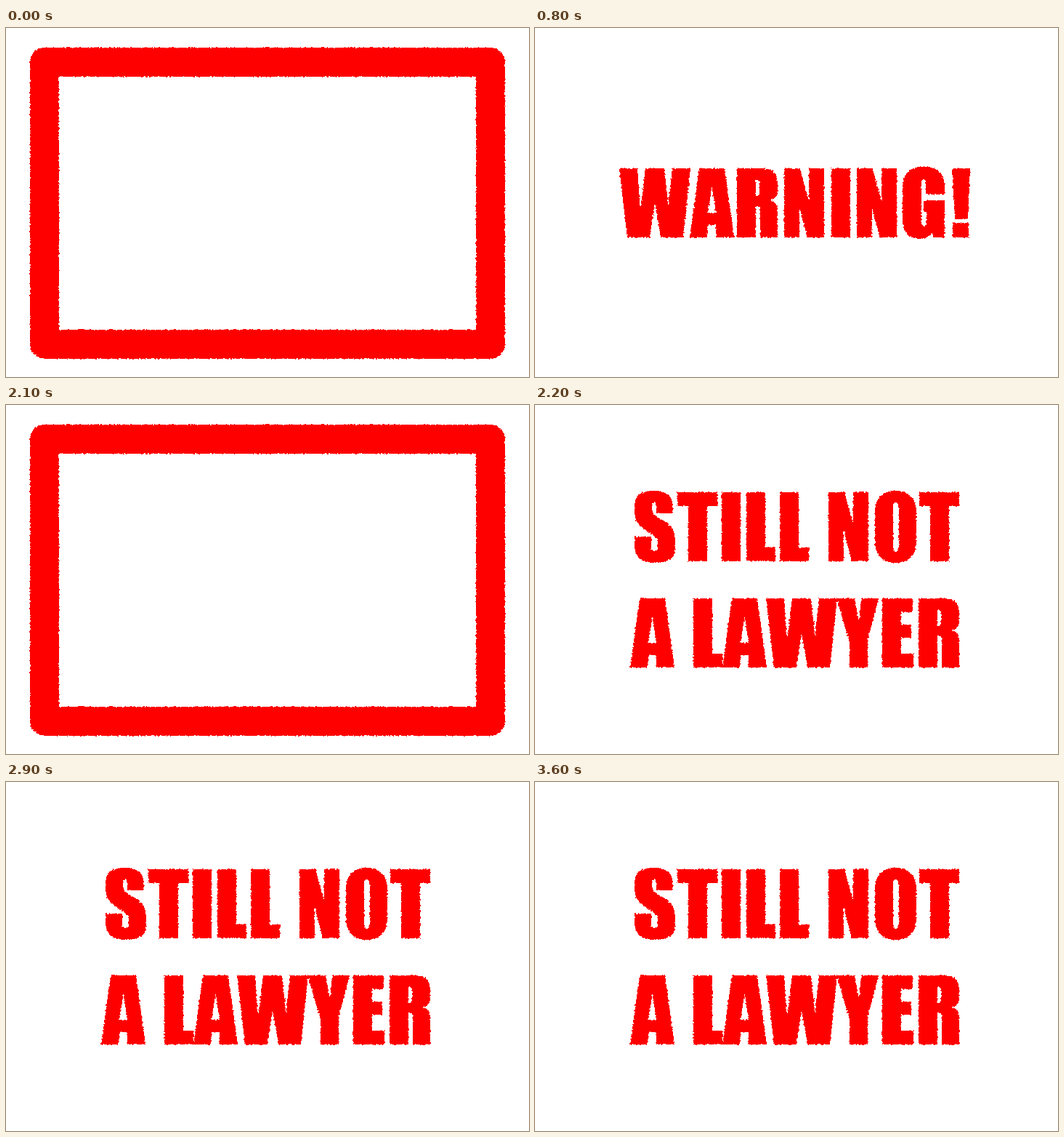
Write an HTML page that moves like this. It is 720 by 480 pixels and loops after 4200 ms.

```html
<!DOCTYPE html>
<html lang="en">
<head>
<meta charset="utf-8">
<title>Warning! Still not a lawyer</title>
<style>
  html, body { margin: 0; width: 100%; height: 100%; overflow: hidden; background: #fff; }
  svg { display: block; width: 720px; height: 480px; }
  g { fill: #f00; fill-rule: evenodd; shape-rendering: crispEdges; }
</style>
</head>
<body>
<svg viewBox="0 0 720 480" role="img">
  <title>WARNING! STILL NOT A LAWYER</title>
  <filter id="rough" filterUnits="userSpaceOnUse" x="0" y="0" width="720" height="480" color-interpolation-filters="sRGB">
    <feTurbulence type="fractalNoise" baseFrequency="0.43" numOctaves="1" seed="7" result="noise"/>
    <feDisplacementMap in="SourceGraphic" in2="noise" scale="4" xChannelSelector="R" yChannelSelector="G"/>
  </filter>
  <g id="border" filter="url(#rough)">
    <rect x="53" y="47" width="614" height="388" fill="none" stroke="#f00" stroke-width="40" stroke-linejoin="round"/>
  </g>
  <g id="warning" filter="url(#rough)"></g>
  <g id="lawyer" filter="url(#rough)"></g>
</svg>
<script>
// Heavy condensed capitals, 95 px tall, origin at the top left.
const glyphs = {
  A: 'M13 0H48L61 95H36.5L35.5 78H25.5L24 95H0ZM30.5 26L25 61H36Z',
  E: 'M0 0H42V19H26V36H40V54H26V76H43V95H0Z',
  G: 'M58 36H32V22Q32 15 29 15T26 22V72Q26 80 29 80Q33 80 33 73V60H29V44H58V95H42L41 87Q36 97 24 97Q12 97 6 90Q0 83 0 70V26Q0 12 7 5Q14 -2 29 -2T51 5Q58 12 58 27Z',
  I: 'M0 0H26V95H0Z',
  L: 'M0 0H26V76H40V95H0Z',
  N: 'M0 0H22L34 43V0H55V95H32L21 52V95H0Z',
  O: 'M0 28C0 8 10 -2 28.5 -2S57 8 57 28V67C57 87 47 97 28.5 97S0 87 0 67ZM24.5 22V74Q24.5 82 28.5 82T32.5 74V22Q32.5 14 28.5 14T24.5 22Z',
  R: 'M0 0H31Q48 0 53 7Q56 12 56 28Q56 37 53 40Q50 43 46 44Q56 46 56 58V95H32V60Q32 54 31 53Q29 52 26 52V95H0ZM26 16V38Q31 38 31 34V20Q31 16 26 16Z',
  S: 'M53 29H30V21Q30 14 27 14T24 20Q24 27 27 30Q29 33 38 38Q50 45 53 51Q56 58 56 70Q56 84 53 89Q49 93 43 95Q37 97 28 97Q18 97 11 94Q4 90 2 84Q0 79 0 68V61H23V74Q23 81 28 81Q32 81 32 74Q32 66 30 63Q27 60 17 53Q6 46 3 40Q0 34 0 24Q0 11 3 7Q8 -2 26 -2Q40 -2 47 4Q53 10 53 22Z',
  T: 'M0 0H55V19H40.5V95H14.5V19H0Z',
  W: 'M0 0H25L29 57L36 0H62L67.5 50L73 0H98L88 95H57L49 47L42 95H11Z',
  Y: 'M1 0H26L32 32L35 0H59L44 57V95H19V60Z',
  '!': 'M0 0H25L22 70H4ZM1 75H23V95H1Z'
};

const scenes = ['border', 'warning', 'lawyer'].map(id => document.getElementById(id));
const [, warning, lawyer] = scenes;

function letter(parent, text, top, lefts) {
  [...text].forEach((char, i) => {
    const path = document.createElementNS(parent.namespaceURI, 'path');
    path.setAttribute('d', glyphs[char]);
    path.setAttribute('transform', `translate(${lefts[i]} ${top})`);
    parent.append(path);
  });
}

letter(warning, 'WARNING!', 193, [116, 213, 278, 342.5, 408, 442.5, 506, 574]);
letter(lawyer, 'STILLNOT', 120, [137, 196, 257, 290.5, 336.5, 404, 468, 529]);
letter(lawyer, 'ALAWYER', 266, [131, 218, 258, 318, 414, 478, 528]);

// Each 700 ms beat opens with a 100 ms border flash; the message changes halfway.
function draw() {
  const time = performance.now() % 4200;
  const current = time % 700 < 100 ? 0 : time < 2100 ? 1 : 2;
  scenes.forEach((scene, i) => { scene.style.display = i === current ? '' : 'none'; });
  requestAnimationFrame(draw);
}
draw();
</script>
</body>
</html>
```
